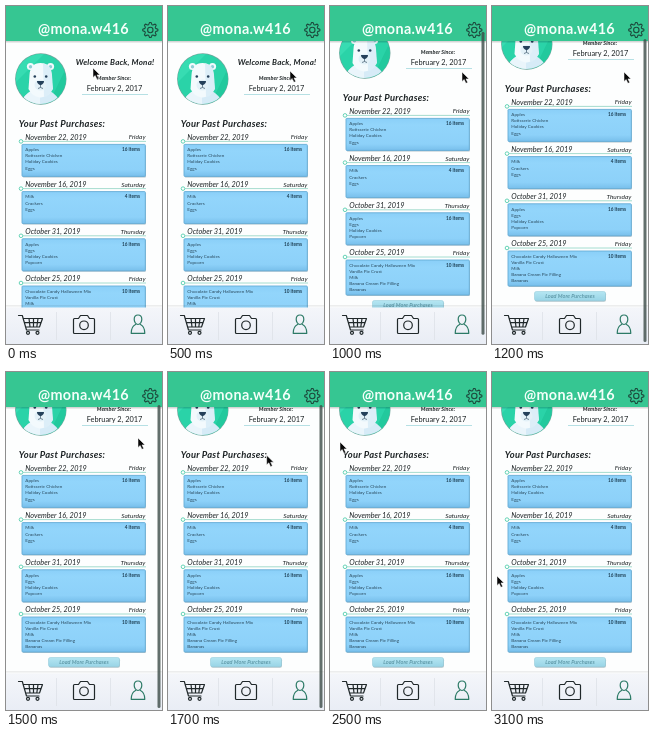
Animation of 156x338 px, one loop 3200 ms. Source, as an HTML page:

```html
<!DOCTYPE html>
<html lang="en">
<head>
<meta charset="utf-8">
<title>Past purchases</title>
<style>
html, body { margin: 0; width: 100%; height: 100%; overflow: hidden; background: #fff; }
svg { display: block; width: 100vw; height: 100vh; }
text { font-family: Lato, "Open Sans", sans-serif; fill: #1d2325; }
.b { font-weight: 700; }
.i { font-style: italic; }
.wide { letter-spacing: .025em; }
</style>
</head>
<body>
<svg viewBox="0 0 156 338" preserveAspectRatio="none">
  <defs>
    <linearGradient id="card" x2="0" y2="1">
      <stop stop-color="#8acff8"/><stop offset=".2" stop-color="#92d5fb"/>
      <stop offset=".8" stop-color="#8dd1f9"/><stop offset="1" stop-color="#78bfeb"/>
    </linearGradient>
    <linearGradient id="button" x2="0" y2="1">
      <stop stop-color="#b5e6f2"/><stop offset="1" stop-color="#98d4e6"/>
    </linearGradient>
    <linearGradient id="dock" x2="0" y2="1">
      <stop stop-color="#f4f6fa"/><stop offset="1" stop-color="#e9edf5"/>
    </linearGradient>
    <linearGradient id="shade" x2="0" y2="1">
      <stop stop-color="#000" stop-opacity=".2"/><stop offset="1" stop-color="#000" stop-opacity="0"/>
    </linearGradient>
    <clipPath id="disc"><circle cx="34.800" cy="73" r="25"/></clipPath>
  </defs>
  <rect width="156" height="338" fill="#fdfefe"/>

  <g id="page">
    <circle cx="34.800" cy="73" r="25.700" fill="#6fa79c"/>
    <g clip-path="url(#disc)">
      <rect x="9" y="47" width="52" height="52" fill="#2ad3a8"/>
      <path d="M9 47h30L9 77z" fill="#37dcb2"/>
      <path d="M61 60v39H42z" fill="#22c99d"/>
      <path d="M14 100q2-10 11-15h19q9 5 12 15z" fill="#d6ebf7"/>
      <path d="M14 100q2-10 11-15l9 3v12z" fill="#eaf5fb"/>
      <g fill="#f3fafd">
        <circle cx="24.500" cy="60.500" r="3.600"/>
        <circle cx="44.500" cy="60.500" r="3.600"/>
        <path d="M34.500 57c7 0 10.500 4.500 11 12l1 14q-4 8-12 8.500-8-.5-12-8.500l1-14c.5-7.500 4-12 11-12z"/>
      </g>
      <circle cx="24.500" cy="60.800" r="1.700" fill="#8fcfd6"/>
      <circle cx="44.500" cy="60.800" r="1.700" fill="#8fcfd6"/>
      <path d="M37 57.500c6 .8 8.500 5 9 11.500l1 14q-4 7-9 8z" fill="#dceef8"/>
      <ellipse cx="34.500" cy="79" rx="6" ry="5.500" fill="#e3f1f8"/>
      <path d="M31 75h7q0 3-3.500 4.200-3.500-1.200-3.500-4.200z" fill="#24405a"/>
      <path d="M34.500 79v2.500m-2.500 1q2.500-2 5 0" fill="none" stroke="#4f6879" stroke-width=".8"/>
      <circle cx="28.800" cy="70.500" r="1.300" fill="#24405a"/>
      <circle cx="40.200" cy="70.500" r="1.300" fill="#24405a"/>
    </g>
    <path d="M76 88.500h66" stroke="#a5d8de" stroke-width=".8"/>
  </g>

  <g id="tabs">
    <rect y="299" width="156" height="3" fill="url(#shade)" opacity=".4"/>
    <rect y="301.500" width="156" height="36.500" fill="url(#dock)"/>
    <path d="M50.500 306v28M104.500 306v28" stroke="#dde1e8" stroke-width=".8"/>
    <g fill="none" stroke="#20282a" stroke-width="1.200" stroke-linejoin="round" stroke-linecap="round">
      <path d="M12.500 309.500h3.800l4.200 14.500h12.500M17.500 312.500h19l-3 8.500H20M18.500 316.700h16.500M23 312.500l1 8.500M27.500 312.500v8.500M32 312.500l-1.200 8.500"/>
      <circle cx="22" cy="326.800" r="1.500"/>
      <circle cx="31.500" cy="326.800" r="1.500"/>
      <path d="M68.500 312.500h4l2-3h7l2 3h4q1 0 1 1v13q0 1-1 1h-19q-1 0-1-1v-13q0-1 1-1z"/>
      <circle cx="78" cy="319.300" r="4.300"/>
      <path d="M132 309c2.800 0 3.800 2.100 3.800 4.300s-1.400 5.200-3.800 5.200-3.800-3-3.800-5.200 1-4.300 3.800-4.300zM129.500 318.500c-3.200 1.600-4.300 3.500-4.300 8.800h13.600c0-5.300-1.100-7.200-4.300-8.800" stroke="#2c7a66"/>
    </g>
  </g>

  <g id="head">
    <rect y="35" width="156" height="2.500" fill="url(#shade)"/>
    <rect width="156" height="35" fill="#36c692"/>
    <g id="gear" fill="none" stroke="#1d4a3d" stroke-width="1.100" stroke-linejoin="round">
      <circle cx="144.300" cy="24" r="2.700"/>
    </g>
  </g>

  <rect id="bar" x="151.500" width="3" height="303" rx="1.500" fill="#3c4b48"/>
  <path id="cursor" d="M0 0v9.500l2.200-2 1.700 3.800 1.800-.8-1.700-3.600h3z" fill="#080808" stroke="#fff" stroke-width=".5"/>
</svg>
<script>
const $ = id => document.getElementById(id);
const page = $('page');

function add(parent, tag, attrs, content) {
  const el = document.createElementNS('http://www.w3.org/2000/svg', tag);
  for (const key in attrs) el.setAttribute(key, attrs[key]);
  if (content) el.textContent = content;
  parent.append(el);
  return el;
}

function label(parent, content, x, y, size, cls = '', anchor = 'start', fill) {
  const el = add(parent, 'text', { x, y, 'font-size': size, class: cls, 'text-anchor': anchor }, content);
  if (fill) el.style.fill = fill;
}

function addOrder(date, day, count, items, y) {
  const height = items.length > 4 ? 35 : 32;
  label(page, date, 19.3, y, 7.3, 'i');
  label(page, day, 139.5, y - .3, 6.5, 'i', 'end');
  add(page, 'path', { d: `M17 ${y + 1.7}H140`, stroke: '#8fd3c3', 'stroke-width': .8 });
  add(page, 'rect', { x: 16.7, y: y + 5.7, width: 123.3, height, rx: 1, fill: '#7f9aa8', opacity: .6 });
  add(page, 'rect', { x: 16, y: y + 4.7, width: 123.3, height, rx: .8, fill: 'url(#card)', stroke: '#66add6', 'stroke-width': .9 });
  add(page, 'circle', { cx: 15, cy: y + 1.7, r: 1.8, fill: '#fff', stroke: '#55cfae', 'stroke-width': .9 });
  items.forEach((item, i) => label(page, item, 19.3, y + 11.5 + i * 6.1, 4.6, '', 'start', '#2a4a5e'));
  label(page, count + ' items', 134, y + 11.5, 4.7, 'b', 'end', '#1d3f54');
}

label(page, 'Welcome Back, Mona!', 109, 59.3, 8, 'b i wide', 'middle');
label(page, 'Member Since:', 108, 74, 5.3, 'b i wide', 'middle');
label(page, 'February 2, 2017', 108.5, 85.3, 7.4, '', 'middle');
label(page, 'Your Past Purchases:', 12.8, 120.5, 9.4, 'b i wide');

[
  ['November 22, 2019', 'Friday', 16, ['Apples', 'Rotisserie Chicken', 'Holiday Cookies', 'Eggs']],
  ['November 16, 2019', 'Saturday', 4, ['Milk', 'Crackers', 'Eggs']],
  ['October 31, 2019', 'Thursday', 16, ['Apples', 'Eggs', 'Holiday Cookies', 'Popcorn']],
  ['October 25, 2019', 'Friday', 10, ['Chocolate Candy Halloween Mix', 'Vanilla Pie Crust', 'Milk', 'Banana Cream Pie Filling', 'Bananas']]
].forEach((order, i) => addOrder(...order, 133.7 + i * 47.2));

add(page, 'rect', { x: 43, y: 321.5, width: 71, height: 9.3, rx: 1.8, fill: '#8ba3aa', opacity: .6 });
add(page, 'rect', { x: 42.5, y: 320.5, width: 71, height: 9.3, rx: 1.8, fill: 'url(#button)', stroke: '#8cc6d6', 'stroke-width': .5 });
label(page, 'Load More Purchases', 78, 327.2, 5.6, 'i', 'middle', '#4c8796');

label($('head'), '@mona.w416', 77.5, 27.6, 14.4, 'b wide', 'middle', '#f4fffa');

const teeth = Array.from({ length: 32 }, (_, i) => {
  const r = i % 4 < 2 ? 7.6 : 5.6;
  const a = (i - .5) * Math.PI / 16;
  return `${144.3 + r * Math.cos(a)},${24 + r * Math.sin(a)}`;
});
add($('gear'), 'polygon', { points: teeth.join(' ') });

// Keys: time, value...
const scrollKeys = [[600, 0], [700, 1], [800, 4], [900, 15], [1000, 26], [1100, 32], [1200, 35]];
const cursorKeys = [
  [0, 87, 62], [200, 92, 62], [600, 132, 66], [1500, 132, 66], [1800, 82, 92],
  [2100, 28, 111], [2300, 18, 92], [2500, 10, 70], [2700, 8, 110], [3000, 5, 204], [3200, 5, 204]
];

function sample(keys, t) {
  const n = keys.findIndex(k => k[0] > t);
  if (n < 0) return keys[keys.length - 1].slice(1);
  if (!n) return keys[0].slice(1);
  const a = keys[n - 1], b = keys[n];
  const p = (t - a[0]) / (b[0] - a[0]);
  return a.slice(1).map((v, i) => v + (b[i + 1] - v) * p);
}

function draw(ms) {
  const t = Math.floor(ms % 3200 / 100) * 100;
  const [scroll] = sample(scrollKeys, t);
  const [x, y] = sample(cursorKeys, t);
  page.setAttribute('transform', `translate(0 ${-scroll})`);
  $('cursor').setAttribute('transform', `translate(${x} ${y})`);
  $('bar').setAttribute('y', 5 + scroll * .8);
  $('bar').setAttribute('opacity', t < 700 ? 0 : .8 * Math.max(0, Math.min(1, (2400 - t) / 200)));
}

const start = performance.now();
function tick() {
  draw(performance.now() - start);
  requestAnimationFrame(tick);
}
tick();
</script>
</body>
</html>
```
